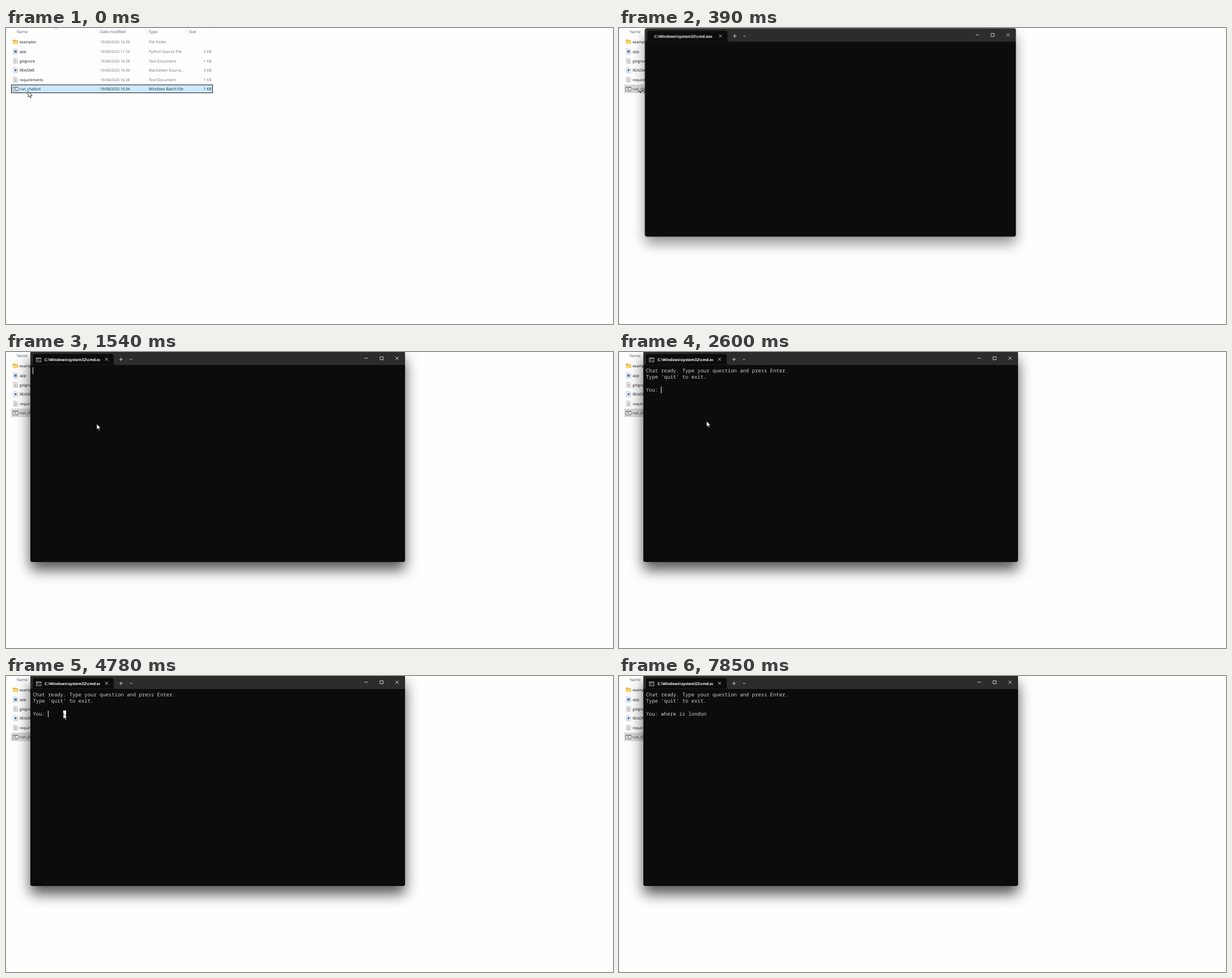
These frames come from a looping animation (1071 by 523 pixels, 8 s). An HTML page:

```html
<!DOCTYPE html>
<html lang="en">
<head>
<meta charset="utf-8">
<title>Chat launcher</title>
<style>
  html, body { margin: 0; width: 100%; height: 100%; overflow: hidden; background: #fefefe; }
  #stage { position: relative; width: 1071px; height: 523px; overflow: hidden; text-rendering: geometricPrecision; }
  #stage *, #stage { --loop: 8s step-end infinite; }
  svg, .layer { position: absolute; left: 0; top: 0; width: 1071px; height: 523px; overflow: visible; }
  .abs { position: absolute; white-space: pre; }

  /* file list */
  .list text { font: 6.6px "Open Sans", "Noto Sans", sans-serif; fill: #111; }
  .list .head { font-size: 6.8px; fill: #4c5a70; }
  .list .date { font-size: 6.47px; fill: #6d6d6d; }
  .list .type { font-size: 6.75px; fill: #6d6d6d; }
  .list .size { font-size: 6.6px; fill: #6d6d6d; text-anchor: end; }
  .list .picked text { fill: #1c2833; }
  .pick { fill: #cce8ff; stroke: #1a1a1a; animation: unfocus var(--loop); }
  @keyframes unfocus { 4.875%, 100% { fill: #d9d9d9; stroke: #d9d9d9; } }

  /* terminal window */
  #win { transform-origin: 373.5px 185px; animation: grow var(--loop); }
  @keyframes grow {
    0% { transform: scale(.958); opacity: 0; }
    4% { transform: translate(-2px, -1px) scale(.958); opacity: 1; }
    4.875% { transform: translate(-.5px, -.5px) scale(.99); opacity: 1; }
    5.75% { transform: scale(.997); opacity: 1; }
    6.625%, 100% { transform: none; opacity: 1; }
  }
  .frame {
    position: absolute; left: 43px; top: -1px; width: 661px; height: 372px;
    border-radius: 4px; overflow: hidden; animation: body var(--loop);
  }
  @keyframes body {
    0% { background: transparent; box-shadow: 0 0 1px #333, 0 14px 24px rgba(0,0,0,.5); }
    4.875% { background: #0c0c0c; box-shadow: 0 0 1px #333, 0 13px 24px rgba(0,0,0,.42); }
    9%, 100% { background: #0c0c0c; box-shadow: 0 0 1px #222, 0 14px 25px rgba(0,0,0,.68); }
  }
  .bar { height: 23.5px; animation: bar var(--loop); }
  @keyframes bar { 0% { background: #333; } 4.875%, 100% { background: #2c2c2c; } }
  .tab, .body { animation: from390 var(--loop); }
  @keyframes from390 { 0% { opacity: 0; } 4.875%, 100% { opacity: 1; } }
  .icon, .spot { animation: from720 var(--loop); }
  @keyframes from720 { 0% { opacity: 0; } 9%, 100% { opacity: 1; } }
  .adds { animation: adds var(--loop); }
  @keyframes adds { 0% { transform: translateX(-142.6px); } 4.875%, 100% { transform: none; } }
  .line { fill: none; stroke: #e4e4e4; stroke-width: .9; }
  .title {
    top: 8px; height: 11px; line-height: 11px; overflow: hidden; color: #fff;
    font: 700 6.68px/11px "Open Sans", "Noto Sans", sans-serif; animation: title var(--loop);
  }
  @keyframes title {
    0% { left: 59.4px; width: 110px; opacity: 0; }
    4.875% { left: 59.4px; width: 110px; opacity: 1; }
    9%, 100% { left: 68px; width: 98.3px; opacity: 1; }
  }

  /* console text */
  .con { left: 47.5px; color: #ccc; font: 500 8.92px/11.3px "Noto Sans Mono", "DejaVu Sans Mono", monospace; }
  .out { top: 27.2px; animation: out var(--loop); }
  @keyframes out { 0% { opacity: 0; } 24.125%, 100% { opacity: 1; } }
  .typed { left: 74.2px; top: 61.1px; overflow: hidden; height: 11.3px; animation: type 8s step-end infinite; }
  @keyframes type {
    0% { width: 0; }
    68% { width: 1ch; }
    69.75% { width: 2ch; animation-timing-function: steps(7, end); }
    78.875% { width: 9ch; }
    81.375% { width: 10ch; }
    84.125% { width: 11ch; animation-timing-function: steps(4, end); }
    88.125%, 100% { width: 15ch; }
  }
  .caret { width: 1px; height: 12px; background: #e6e6e6; }
  .c1 { left: 47px; top: 27px; animation: c1 var(--loop); }
  @keyframes c1 { 0%, 24.125%, 100% { opacity: 0; } 17.5% { opacity: 1; } }
  .c2 { left: 74.2px; top: 61px; font: 8.92px "Noto Sans Mono", "DejaVu Sans Mono", monospace;
    animation: c2 var(--loop), slide 8s step-end infinite; }
  @keyframes c2 {
    0%, 39.125%, 53%, 67.125%, 90.625%, 100% { opacity: 0; }
    31.625%, 46%, 59.75%, 68% { opacity: 1; }
  }
  @keyframes slide {
    0% { transform: none; }
    68% { transform: translateX(1ch); }
    69.75% { transform: translateX(2ch); animation-timing-function: steps(7, end); }
    78.875% { transform: translateX(9ch); }
    81.375% { transform: translateX(10ch); }
    84.125% { transform: translateX(11ch); animation-timing-function: steps(4, end); }
    88.125%, 100% { transform: translateX(15ch); }
  }
  .c3 { left: 47px; top: 72px; animation: c3 var(--loop); }
  @keyframes c3 { 0%, 98.125%, 100% { opacity: 0; } 90.625% { opacity: 1; } }

  /* pointer */
  .arrow { animation: move var(--loop), show var(--loop); }
  @keyframes show { 0%, 9% { opacity: 1; } 4%, 69.75%, 100% { opacity: 0; } }
  @keyframes move {
    0% { transform: translate(39px, 112px); }
    9% { transform: translate(50px, 109px); animation-timing-function: steps(7, end); }
    15% { transform: translate(152px, 122px); }
    16.625% { transform: translate(152px, 122px); animation-timing-function: steps(3, end); }
    19.25% { transform: translate(160px, 127px); }
    23.25% { transform: translate(160px, 127px); animation-timing-function: steps(3, end); }
    25.875% { transform: translate(159px, 128px); }
    30.625% { transform: translate(159px, 128px); animation-timing-function: steps(8, end); }
    39.125% { transform: translate(123px, 81px); }
    46% { transform: translate(122px, 80px); animation-timing-function: steps(11, end); }
    55.5% { transform: translate(99px, 66px); }
    56.375%, 100% { transform: translate(101px, 66px); }
  }
  .busy { animation: busy var(--loop); }
  @keyframes busy { 0%, 9%, 100% { opacity: 0; } 4% { opacity: 1; } }
  .block { left: 0; top: 0; background: #fff; animation: block var(--loop); }
  @keyframes block {
    0% { opacity: 0; width: 11px; height: 12px; transform: translate(117px, 72px); }
    46% { opacity: 1; width: 11px; height: 12px; transform: translate(117px, 72px); animation-timing-function: steps(11, end); }
    55.5% { opacity: 1; width: 11px; height: 12px; transform: translate(94px, 59px); }
    56.375% { opacity: 1; width: 5px; height: 13px; transform: translate(101px, 61px); }
    68%, 100% { opacity: 0; width: 5px; height: 13px; transform: translate(101px, 61px); }
  }
</style>
</head>
<body>
<div id="stage">
  <svg class="list" viewBox="0 0 1071 523">
    <defs>
      <g id="page"><path d="M.5.5H6L8 2.5V9.5H.5Z" fill="#fafafa" stroke="#a9a9a9" stroke-width=".7"/></g>
      <g id="doc"><use href="#page"/><path d="M2 3H6M2 4.6H6.6M2 6.2H6.6M2 7.8H6.6" stroke="#8c8c8c" stroke-width=".7"/></g>
    </defs>
    <path d="M.5 0V523" stroke="#f1f1f1"/>
    <path d="M162.5 0V13M248.5 0V13M319.5 0V13M367.5 0V13" stroke="#e8edf2"/>
    <path d="M86.5 1.5L88.5 0L90.5 1.5" fill="none" stroke="#777" stroke-width=".8"/>
    <g>
      <text class="head" x="19" y="9">Name</text>
      <text class="head" x="166" y="9">Date modified</text>
      <text class="head" x="252" y="9">Type</text>
      <text class="head" x="323" y="9">Size</text>
    </g>
    <rect class="pick" x="9.5" y="100.5" width="355" height="14"/>
    <path d="M12 21.3q0-.8.8-.8H15.5L16.7 21.7H20.6q.7 0 .7.7V28H12Z" fill="#e9ae36"/>
    <path d="M12 23H21.3V27.5q0 .7-.7.7H12.7q-.7 0-.7-.7Z" fill="#fbd36b"/>
    <use href="#page" x="12.5" y="36.5"/><rect x="14.6" y="39.4" width="4.4" height="4.4" fill="#3f7fcb"/>
    <use href="#doc" x="12.5" y="53"/>
    <use href="#page" x="12.5" y="69.6"/><rect x="15" y="72.7" width="3.6" height="3.8" fill="#3f7fcb"/>
    <use href="#doc" x="12.5" y="86.2"/>
    <path d="M12.3 104.3H21.2V111.3H12.3Z" fill="#f6f6f6" stroke="#555" stroke-width=".8"/>
    <path d="M12.3 105.2H21.2" stroke="#777" stroke-width="1"/>
    <circle cx="16" cy="107.8" r="1.2" fill="none" stroke="#666" stroke-width=".8"/>
    <path d="M17 108.7L19.3 110.3" stroke="#666" stroke-width=".9"/>
    <g>
      <text x="24" y="27.3">examples</text><text class="date" x="166" y="27.3">19/08/2025 16:29</text><text class="type" x="252" y="27.3">File folder</text>
    </g>
    <g>
      <text x="24" y="43.9">app</text><text class="date" x="166" y="43.9">19/08/2025 11:53</text><text class="type" x="252" y="43.9">Python Source File</text><text class="size" x="362.5" y="43.9">2 KB</text>
    </g>
    <g>
      <text x="24" y="60.5">gitignore</text><text class="date" x="166" y="60.5">19/08/2025 16:28</text><text class="type" x="252" y="60.5">Text Document</text><text class="size" x="362.5" y="60.5">1 KB</text>
    </g>
    <g>
      <text x="24" y="77.1">README</text><text class="date" x="166" y="77.1">19/08/2025 16:30</text><text class="type" x="252" y="77.1">Markdown Source...</text><text class="size" x="362.5" y="77.1">3 KB</text>
    </g>
    <g>
      <text x="24" y="93.7">requirements</text><text class="date" x="166" y="93.7">19/08/2025 16:28</text><text class="type" x="252" y="93.7">Text Document</text><text class="size" x="362.5" y="93.7">1 KB</text>
    </g>
    <g class="picked">
      <text x="24" y="110.3">run_chatbot</text><text class="date" x="166" y="110.3">19/08/2025 16:34</text><text class="type" x="252" y="110.3">Windows Batch File</text><text class="size" x="362.5" y="110.3">1 KB</text>
    </g>
  </svg>

  <div id="win" class="layer">
    <div class="frame"><div class="bar"></div></div>
    <svg viewBox="0 0 1071 523">
      <g class="tab">
        <path d="M44 22.6Q47.5 22.6 47.5 19V7.5Q47.5 3.5 51.5 3.5H186Q190 3.5 190 7.5V19Q190 22.6 193.5 22.6Z" fill="#0c0c0c"/>
        <path class="line" d="M175 10.4L180 15.4M180 10.4L175 15.4"/>
        <path d="M212.5 9V17" stroke="#444" stroke-width=".8"/>
      </g>
      <g class="icon">
        <rect x="53.4" y="10.4" width="8.4" height="7" fill="#0c0c0c" stroke="#b5b5b5" stroke-width=".8"/>
        <path d="M53 11H62.2" stroke="#c4c4c4" stroke-width="1.1"/>
        <path d="M57 13.2H55.2V15.4H57M58 13L59 15.6M59.3 15.7H61" fill="none" stroke="#ddd" stroke-width=".6"/>
      </g>
      <g class="adds line">
        <path d="M199.7 13H206.1M202.9 9.8V16.2"/>
        <path d="M218.3 12L220.5 14.2L222.7 12"/>
      </g>
      <path class="line" d="M632.5 10.9H638.5M660 8.3H665.4V13.7H660ZM687.2 8.2L692.8 13.8M692.8 8.2L687.2 13.8"/>
      <rect class="spot" x="54" y="120" width="4" height="7" rx="2" fill="#1e060a"/>
    </svg>
    <div class="abs title">C:\Windows\system32\cmd.exe</div>
    <div class="abs con out">Chat ready. Type your question and press Enter.
Type 'quit' to exit.

You: </div>
    <div class="abs con typed">where is london</div>
    <div class="abs caret c1"></div>
    <div class="abs caret c2"></div>
    <div class="abs caret c3"></div>
  </div>

  <div class="abs block"></div>
  <svg viewBox="0 0 1071 523">
    <path class="busy" d="M33 112.4Q34.5 110.4 36 112.2L38 114.8L39.2 111.8L41 112.6M40.2 110.6Q43.5 110 45 112V115" fill="none" stroke="#111" stroke-width="1"/>
    <path class="arrow" d="M0 0V10L2.3 7.9L4 11.6L5.6 10.9L4 7.3H7.2Z" fill="#fff" stroke="#0c0c0c" stroke-width=".8"/>
  </svg>
</div>
</body>
</html>
```
